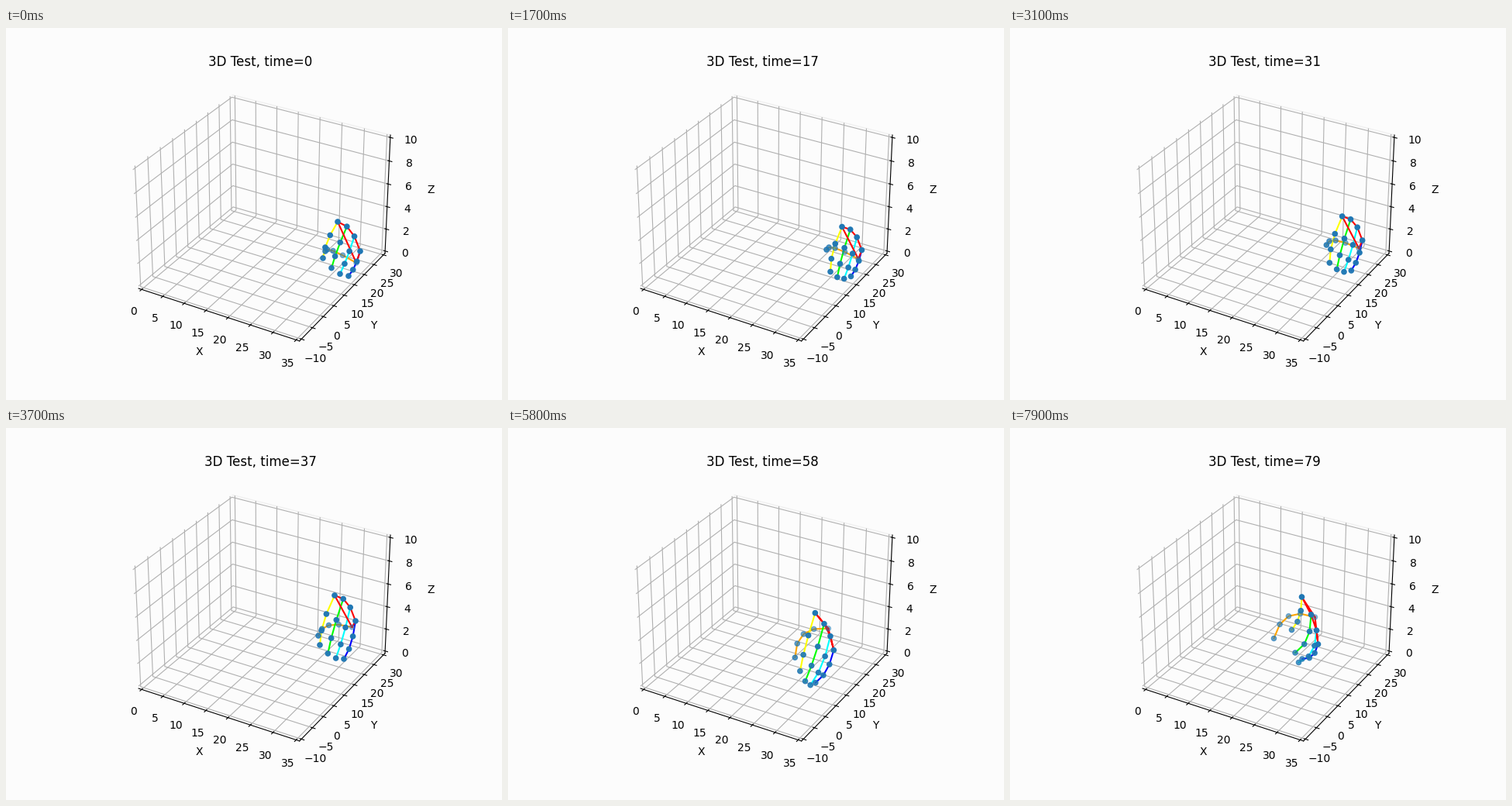
A matplotlib script that plays this animation: 640 px wide and 480 px high, repeating every 8000 ms.

```python
import numpy as np
import matplotlib.pyplot as plt
from matplotlib.animation import FuncAnimation
from matplotlib.colors import to_rgb

W, H, DPI = 640, 480, 100
FRAMES, STEP_MS = 80, 100
PAPER = "#fcfcfc"
DOT = to_rgb("tab:blue")
BONE_COLORS = ["orange", "yellow", "lime", "cyan", "blue", "red"]
PALM = [0, 5, 9, 13, 17, 0]

# Stage points as x + yj: wrist, thumb tip, index and pinky knuckles, index and pinky tips.
REST = np.array([452+303j, 412+288j, 428+250j, 457+288j, 409+297j, 442+320j])
DROP = np.array([452+298j, 411+286j, 431+256.5j, 456.5+286.5j, 416+314.5j, 442.5+320.5j])
LIFT = np.array([446.5+257j, 403+268j, 424+216j, 451+249j, 405+280j, 436+298j])
REACH = np.array([427+243j, 378+274.5j, 404.5+218j, 428+256j, 382+292j, 407.5+307j])
LOWER = np.array([414+261j, 371+298.5j, 397+241j, 421+289j, 377.5+316j, 397.5+331j])
GRASP = np.array([393.5+244j, 340.5+271.5j, 376.5+218j, 397.5+279j, 363.5+260.5j, 377+298j])

KEYS = {
    0: REST, 10: DROP, 28: DROP, 37: LIFT, 49: REACH,
    54: LOWER - 14j, 60: LOWER - 1 + 3.5j, 67: LOWER, 72: LOWER - 3.5 - 3j,
    79: GRASP,
}
TIMES = list(KEYS)
TRACKS = np.array(list(KEYS.values())).T


def arc(start, inner, end):
    """Four even samples of the parabola that passes the inner point a third of the way."""
    return np.array([start, inner, inner + (end - start) / 3, end])


def spread(first, last, bulge):
    return arc(first, first + (last - first) / 3 + bulge, last)


def thumb_joints(wrist, tip, grip):
    rise = (tip - wrist).imag / 2 - 8 - 7 * grip
    mid = wrist - 30 - 4 * grip + 1j * rise
    return [wrist,
            (3 * wrist + 6 * mid - tip) / 8,
            mid,
            (3 * tip + 6 * mid - wrist) / 8,
            tip]


def hand(t):
    """The 21 joints and their opacities; the fist closes while the hand moves away."""
    wrist, thumb_tip, index, pinky, index_tip, pinky_tip = (
        np.interp(t, TIMES, track) for track in TRACKS)
    grip = np.clip((t - 37) / 42, 0, 1)

    joints = thumb_joints(wrist, thumb_tip, grip)
    knuckles = spread(index, pinky, 2.2 + 2.8 * grip + (9 * grip - 6.5) * 1j)
    tips = spread(index_tip, pinky_tip, (5 + 12 * grip ** 2) * 1j)
    for n, (knuckle, tip) in enumerate(zip(knuckles, tips)):
        curl = 0.14 * grip ** 2 - 0.05 + n / 30
        inner = knuckle + (tip - knuckle) * (0.39 - curl * 1j)
        joints.extend(arc(knuckle, inner, tip))

    finger = np.linspace(1, 0.95 - 0.2 * grip, 4)
    thumb = np.linspace(0.45, 0.85 - 0.2 * grip, 5)
    return np.array(joints), np.concatenate([thumb, np.tile(finger, 4)])


fig = plt.figure(figsize=(W / DPI, H / DPI), dpi=DPI, facecolor=PAPER)
ax = fig.add_subplot(projection="3d", facecolor=PAPER)
margin = 1 / 48
ax.set_xlim(0, 35, view_margin=margin)
ax.set_ylim(-10, 30, view_margin=margin)
ax.set_zlim(0, 10, view_margin=margin)
ax.set(xlabel="X", ylabel="Y", zlabel="Z")
for axis in (ax.xaxis, ax.yaxis, ax.zaxis):
    axis.set_pane_color(PAPER)
ax.yaxis.pane.set_edgecolor("#f0f0f0")
title = ax.set_title("")

# The hand is posed in stage pixels above the 3D box.
stage = fig.add_axes([0, 0, 1, 1])
stage.set(xlim=(0, W), ylim=(H, 0))
stage.axis("off")

chains = [list(range(5))] + [list(range(k, k + 4)) for k in range(5, 21, 4)] + [PALM]
bones = [stage.plot([], [], color=c, lw=1.5, zorder=2)[0] for c in BONE_COLORS]
dots = stage.scatter(np.zeros(21), np.zeros(21), s=20, zorder=3)


def update(i):
    joints, alpha = hand(i)
    for line, chain in zip(bones, chains):
        line.set_data(joints[chain].real, joints[chain].imag)
    rgba = np.column_stack([np.tile(DOT, (21, 1)), alpha])
    dots.set_offsets(np.column_stack([joints.real, joints.imag]))
    dots.set_facecolors(rgba)
    dots.set_edgecolors(rgba)
    title.set_text(f"3D Test, time={i}")
    return [*bones, dots, title]


anim = FuncAnimation(fig, update, frames=FRAMES, interval=STEP_MS,
                     repeat=True, repeat_delay=0, blit=False)
plt.show()
```
